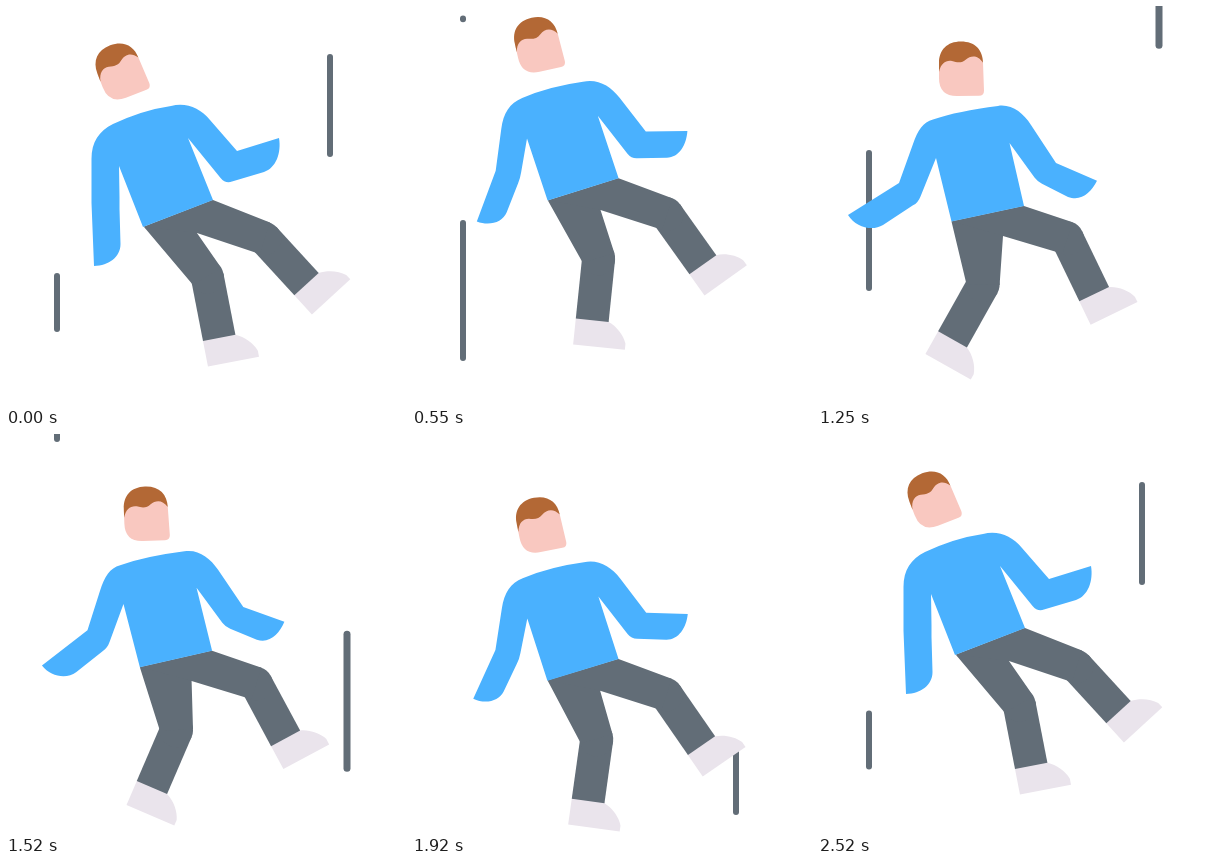
Animation, 400 px wide and 400 px high, one loop 2550 ms. Source, as an HTML page with a canvas:

```html
<!DOCTYPE html>
<html lang="en">
<head>
<meta charset="utf-8">
<title>Falling man</title>
<style>
  html, body { margin: 0; width: 100%; height: 100%; overflow: hidden; background: #fff; }
  canvas { display: block; }
</style>
</head>
<body>
<canvas id="stage" width="400" height="400"></canvas>
<script>
const ctx = document.getElementById('stage').getContext('2d');
const LOOP = 2550, STEP = 25, CYCLE = 101;
const SHIRT = '#4ab1fe', PANTS = '#626d77', SHOE = '#eae4ec', SKIN = '#f9c8c0', HAIR = '#b36835';
const LEG = 33;

const rad = deg => deg * Math.PI / 180;
const lerp = (a, b, p) => a + (b - a) * p;
// Point at a distance from another; angle 0 points right, 90 points down.
const polar = ([x, y], deg, r) => [x + r * Math.cos(rad(deg)), y + r * Math.sin(rad(deg))];

function turn([x, y], deg) {
  const c = Math.cos(rad(deg)), s = Math.sin(rad(deg));
  return [x * c - y * s, x * s + y * c];
}

// Blend two paths that share the same commands.
function morph(from, to, p) {
  const number = /-?\d+(\.\d+)?/g;
  const ends = to.match(number);
  let i = 0;
  return new Path2D(from.replace(number, n => lerp(+n, +ends[i++], p).toFixed(2)));
}

function fill(color, path) {
  ctx.fillStyle = color;
  ctx.fill(path);
}

function polygon(color, points) {
  const path = new Path2D();
  points.forEach(pt => path.lineTo(...pt));
  path.closePath();
  fill(color, path);
}

function placed([x, y], deg, draw) {
  ctx.save();
  ctx.translate(x, y);
  ctx.rotate(rad(deg));
  draw();
  ctx.restore();
}

function bar(color, width, cap, from, to) {
  ctx.beginPath();
  ctx.moveTo(...from);
  ctx.lineTo(...to);
  ctx.lineWidth = width;
  ctx.lineCap = cap;
  ctx.strokeStyle = color;
  ctx.stroke();
}

function speedLine(x, width, top, bottom) {
  const r = width / 2;
  bar(PANTS, width, 'round', [x, top + r], [x, Math.max(bottom - r, top + r + 0.01)]);
}

function longLine(x, width, s) {
  const bottom = 320.4 - 17.37 * s - 0.1025 * s * s - 0.0315 * s ** 3;
  speedLine(x, width, bottom - 141, bottom);
}

function drawLines(f) {
  const a = f > 60 ? f - 102 : f;
  if (a <= 22) {
    const q = a * Math.abs(a);
    speedLine(51, 6, 267 - 9.5 * a - 0.1 * q, 326 - 9.2 * a - 0.222 * q);
  }
  const b = (f < 40 ? f + CYCLE : f) - 77;
  speedLine(324, 6, 313 - 11.04 * b, 381 - 9.58 * b);
  for (const start of [24, 48]) {
    longLine(51, 6, f - start);
    longLine(341, 7, f - start - 14);
  }
}

const shoe = new Path2D('M-16.5-1V26H35.5V20C33 12 25 3.5 16.5 0V-1Z');
const face = new Path2D('M-22-5L-18-14H20L22-6L23 22Q23 27 18 27H-4Q-22 27-22 9Z');
const hair = new Path2D('M-22 3C-20-6-15-9-9-8C-3-6 1-6 5-9.5C10-13.5 17-14 22-6C22-19 14-27.5 0-27.5C-14-27.5-22-19-22-6Z');

const shirtTilted = 'M0 0L-70 27L-94 -34L-93.5 -3Q-93.5 3 -93.5 9L-92.5 44C-92.5 57 -104 65.5 -119 66' +
  'L-121.5 3L-121.5 -41C-121.5 -58 -114 -69 -100 -76Q-70 -90 -42 -94C-27 -98 -13 -92 -3 -80' +
  'L24 -49L66 -62C68.5 -47 63 -32 51 -28L19 -18.4Q12.2 -16.4 7.8 -21.8L-25 -62Z';
const shirtUpright = 'M0 0L-72.5 15.5L-88 -48L-103.5 -9.5Q-106 -3 -111 -0.7L-141 19C-151.5 25.5 -168 21.7 -176 9' +
  'L-125 -23L-111 -62C-106 -76 -101 -84 -91 -86.5Q-66 -95 -26 -100C-12 -102 -1 -93 7 -81' +
  'L32 -43L73 -25C67 -13 57 -4 44 -9L18 -22.2Q13.5 -24.5 10.5 -28.5L-14.5 -63Z';

function shin(knee, deg) {
  const ankle = polar(knee, deg, 62.5);
  placed(ankle, deg - 90, () => fill(SHOE, shoe));
  bar(PANTS, LEG, 'butt', knee, ankle);
  bar(PANTS, LEG, 'round', knee, polar(knee, deg, 1));
}

function drawLegs(p, swing, tilt) {
  const r = LEG / 2;
  const hip = [0, 0], waist = turn([-72.5, 15.5], tilt), crotch = turn([-21, 30], tilt);
  const thigh = lerp(59.5, 91, swing);
  const kneeL = polar(turn([-40, 18], tilt), thigh, 61);
  const kneeR = [lerp(51.3, 43, p), lerp(38.1, 32, p)];
  shin(kneeL, lerp(79, 119.5, swing));
  shin(kneeR, lerp(47.5, 64.3, swing));
  polygon(PANTS, [hip, waist, polar(kneeL, thigh + 90, r), polar(kneeL, thigh - 90, r), crotch]);
  polygon(PANTS, [hip, polar(kneeR, -70, r), polar(kneeR, 106, r), crotch, waist]);
}

function drawHead(p) {
  const pos = [lerp(-93, -63, p), lerp(-129, -137, p) - 6 * p * (1 - p)];
  placed(pos, lerp(-21, 0, p), () => {
    fill(SKIN, face);
    fill(HAIR, hair);
  });
}

function draw(f) {
  const phase = 2 * Math.PI * f / CYCLE, s = Math.sin(phase);
  const p = (1 - Math.cos(phase)) / 2;
  // The legs ease more gently than the rest.
  const swing = (p + 1 - Math.abs(1 - 2 * f / CYCLE)) / 2;
  ctx.fillStyle = '#fff';
  ctx.fillRect(0, 0, 400, 400);
  drawLines(f);
  ctx.save();
  ctx.translate(207 - p, 194 - 26.5 * s + 1.5 * s * s + 6.7 * p);
  drawLegs(p, swing, -9 * (1 - p));
  fill(SHIRT, morph(shirtTilted, shirtUpright, p));
  drawHead(p);
  ctx.restore();
}

const begin = performance.now();
function tick() {
  const t = (performance.now() - begin) % LOOP;
  draw(Math.min(CYCLE, Math.floor((t + 5) / STEP)));
  requestAnimationFrame(tick);
}
tick();
</script>
</body>
</html>
```
